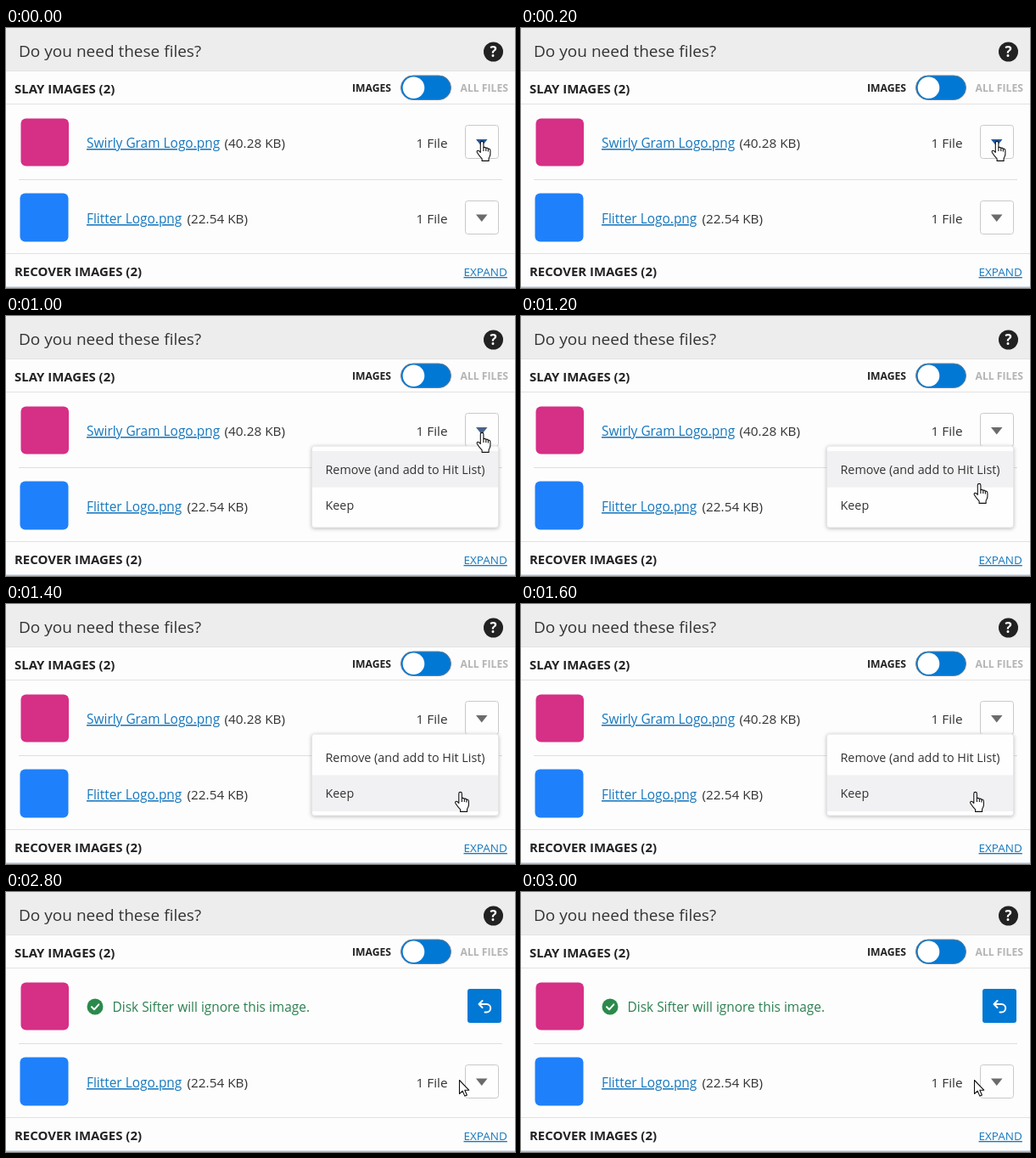
These frames come from a looping animation (600 by 306 pixels, 4000 ms). An HTML page:

```html
<!DOCTYPE html>
<html lang="en">
<head>
<meta charset="utf-8">
<title>File review</title>
<style>
  html, body { margin: 0; width: 100%; height: 100%; overflow: hidden; background: #fdfdfd; }
  svg { display: block; width: 600px; height: 306px; }
  text { font: 15.35px "Open Sans", "Noto Sans", sans-serif; fill: #333; white-space: pre; }
  .title { font-size: 19px; }
  .head { font-size: 14.95px; font-weight: 700; fill: #222; }
  .tag { font-size: 12.2px; font-weight: 700; fill: #222; }
  .off { fill: #b4b4b4; }
  .link { font-size: 15.45px; fill: #1577be; text-decoration: underline; }
  .small { font-size: 13.5px; }
  .item { font-size: 14.35px; }
  .note { font-size: 15.45px; fill: #2c8050; }
  .line { stroke: #e2e2e2; }
  .btn { fill: #fefefe; stroke: #c9c9c9; }
  .icon { fill: none; stroke: #fff; stroke-width: 2; stroke-linecap: round; stroke-linejoin: round; }
  .cursor { fill: #fff; stroke: #111; stroke-width: 1.1; stroke-linejoin: round; }
  #panel { filter: drop-shadow(0 1px 2px rgba(0, 0, 0, .25)); }
</style>
</head>
<body>
<svg viewBox="0 0 600 306">
  <defs>
    <path id="tri" d="M554 131H567.5L560.75 139.5Z"/>
  </defs>
  <rect width="600" height="306" fill="#fdfdfd"/>

  <rect width="600" height="50" fill="#ededed"/>
  <path class="line" d="M0 50.5H600M0 89.5H600M0 265.5H600"/>
  <path d="M15 178.5H585" stroke="#dedede"/>
  <rect y="304.5" width="600" height="1.5" fill="#a9bdd3"/>

  <text class="title" x="15" y="34">Do you need these files?</text>
  <circle cx="574.5" cy="28" r="11.5" fill="#222"/>
  <text x="574.5" y="34" text-anchor="middle" style="font-size:17px;font-weight:700;fill:#fff">?</text>

  <text class="head" x="10" y="77">SLAY IMAGES (2)</text>
  <text class="tag" x="408" y="75">IMAGES</text>
  <text class="tag off" x="535.5" y="75">ALL FILES</text>
  <rect x="465.5" y="56" width="59" height="28.5" rx="14.25" fill="#0078d4" stroke="#6d7f91"/>
  <circle cx="480.5" cy="70.3" r="12.8" fill="#fff"/>

  <rect x="17.5" y="106.5" width="56.5" height="56" rx="6" fill="#d62f86"/>
  <rect x="16.5" y="194.5" width="57" height="57" rx="6" fill="#1f80fb"/>

  <g id="file">
    <text class="link" x="95" y="141">Swirly Gram Logo.png</text>
    <text x="257.5" y="141">(40.28 KB)</text>
    <text x="483.5" y="141">1 File</text>
    <rect class="btn" x="541.5" y="114.5" width="39" height="39" rx="3"/>
    <use id="arrow" href="#tri"/>
  </g>

  <g id="done">
    <circle cx="105" cy="135" r="9.5" fill="#2b8a4b"/>
    <path class="icon" d="M101 135.3L104 138.3L109.3 132.3"/>
    <text class="note" x="125.5" y="141">Disk Sifter will ignore this image.</text>
    <rect x="544" y="114" width="40" height="40" rx="3" fill="#0078d4"/>
    <path class="icon" d="M561.5 128L557.5 132L561.5 136M557.5 132H566.5A4.7 4.7 0 0 1 566.5 141.4H564.5"/>
  </g>

  <text class="link" x="95" y="230">Flitter Logo.png</text>
  <text x="213.5" y="230">(22.54 KB)</text>
  <text x="483.5" y="230">1 File</text>
  <rect class="btn" x="541.5" y="203.5" width="39" height="39" rx="3"/>
  <use href="#tri" y="88.5" fill="#6b6b6b"/>

  <text class="head" x="10" y="292">RECOVER IMAGES (2)</text>
  <text class="link small" x="539.5" y="292">EXPAND</text>

  <g id="menu">
    <rect id="panel" x="360.5" y="153" width="220" height="96" rx="3" fill="#fefefe" stroke="#e4e4e4"/>
    <rect id="hover" x="361" width="219" height="42.5" fill="#f1f0f2"/>
    <text class="item" x="376.5" y="186">Remove (and add to Hit List)</text>
    <text class="item" x="376.5" y="228">Keep</text>
  </g>

  <g id="hand" class="cursor">
    <path d="M4.8 2.2A1.8 1.8 0 0 1 8.4 2.2V7.6Q10.2 6.8 11.3 8.3Q13 7.6 13.9 9.2Q16.4 8.8 16.4 11.4V15.6Q16.2 18 14.6 20.2V23.4H6.6V20.8Q3.6 18 1 13.8Q0 11.6 1.6 11.2Q3 11 4.8 13.4Z"/>
    <path fill="none" d="M8.4 7.6V12M11.3 8.3V12M13.9 9.2V12.4"/>
  </g>
  <path id="pointer" class="cursor" d="M0 0V16L3.7 12.6L6.3 18.6L8.9 17.5L6.3 11.7H11.2Z"/>
</svg>
<script>
const LOOP = 4000;
const $ = id => document.getElementById(id);
const show = (id, on) => $(id).setAttribute("visibility", on ? "visible" : "hidden");
const place = (id, x, y) => $(id).setAttribute("transform", `translate(${x} ${y})`);

// Hand positions: start time, x, y, colour of the button arrow
const moves = [
  [0, 554.5, 133, "#24589b"],
  [1000, 554.5, 137, "#48628a"],
  [1200, 533.5, 197, "#6b6b6b"],
  [1400, 529, 221, "#6b6b6b"]
];

function draw(t) {
  const [, x, y, tint] = moves.filter(m => t >= m[0]).pop();
  const kept = t >= 2800;
  const pointing = t < 2600;

  show("file", !kept);
  show("done", kept);
  show("menu", t >= 400 && !kept);
  show("hand", pointing);
  show("pointer", !pointing);

  $("arrow").setAttribute("fill", tint);
  $("hover").setAttribute("y", t < 1400 ? 159 : 201.5);
  place("hand", x, y);
  place("pointer", 534.5, 221.5);
}

const start = performance.now();
function tick() {
  draw((performance.now() - start) % LOOP);
  requestAnimationFrame(tick);
}
draw(0);
requestAnimationFrame(tick);
</script>
</body>
</html>
```
